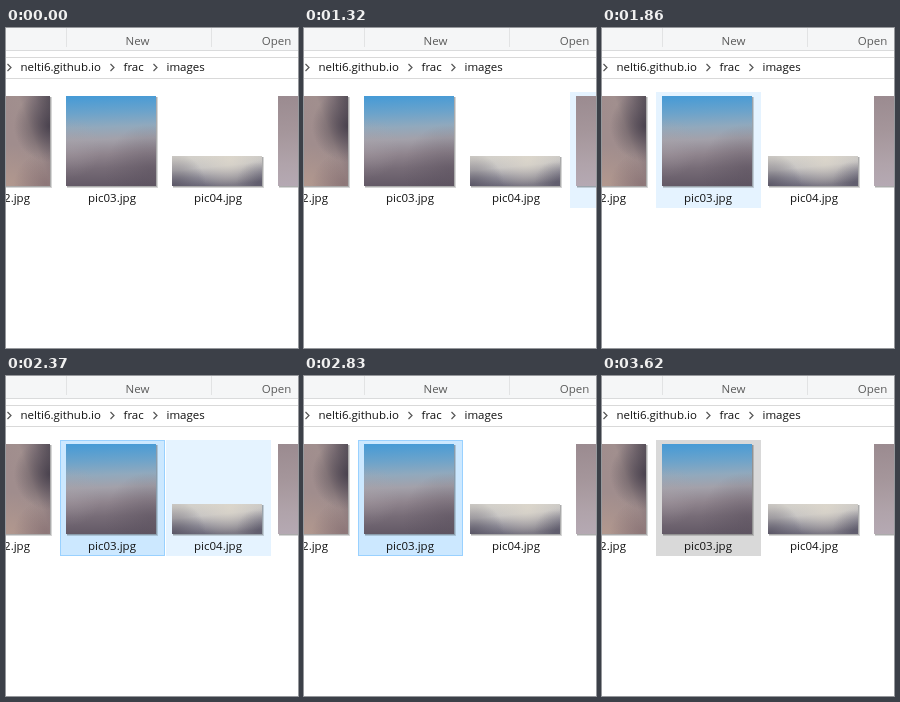
Recreate the animation shown at these times as an HTML page with a canvas. Size 292x320 px, loop 3670 ms.

```html
<!DOCTYPE html>
<html lang="en">
<head>
<meta charset="utf-8">
<title>Image folder</title>
<style>
html, body { margin: 0; width: 100%; height: 100%; overflow: hidden; background: #fff; }
canvas, svg { position: absolute; left: 0; top: 0; width: 292px; height: 320px; }
text { font: 11.5px "Open Sans", "Noto Sans", sans-serif; fill: #111; }
.group { fill: #5a5a5a; }
.mid { text-anchor: middle; }
</style>
</head>
<body>
<canvas id="stage"></canvas>
<svg viewBox="0 0 292 320">
  <text class="group mid" x="131.5" y="17">New</text>
  <text class="group mid" x="270.5" y="17">Open</text>
  <text x="14.5" y="43">nelti6.github.io</text>
  <text x="117.5" y="43">frac</text>
  <text x="160.5" y="43">images</text>
  <text class="mid" x="0" y="174">pic02.jpg</text>
  <text class="mid" x="106" y="174">pic03.jpg</text>
  <text class="mid" x="212" y="174">pic04.jpg</text>
</svg>
<script>
const W = 292, H = 320, LOOP = 3670;
const canvas = document.getElementById('stage');
const ctx = canvas.getContext('2d');
const ratio = window.devicePixelRatio || 1;
canvas.width = Math.round(W * ratio);
canvas.height = Math.round(H * ratio);
ctx.scale(ratio, ratio);

const HOVER = '#e5f3ff', SELECTED = '#cce8ff', BORDER = '#99d1ff', INACTIVE = '#d9d9d9';

// Start time, hovered tile, state of the third tile
const steps = [
  [0, 0, ''],
  [1120, 5, ''],
  [1680, 4, ''],
  [1860, 3, ''],
  [2090, 3, 'selected'],
  [2370, 4, 'selected'],
  [2520, 0, 'selected'],
  [3620, 0, 'inactive']
];

const tileX = n => 54 + (n - 3) * 106;

function rect(x, y, w, h, fill) {
  ctx.fillStyle = fill;
  ctx.fillRect(x, y, w, h);
}

function addStops(g, colors) {
  colors.forEach(([at, c]) => g.addColorStop(at, c));
  return g;
}

const linear = (x0, y0, x1, y1, colors) =>
  addStops(ctx.createLinearGradient(x0, y0, x1, y1), colors);

const glow = (x, y, r, rgb, alpha) =>
  addStops(ctx.createRadialGradient(x, y, 0, x, y, r),
    [[0, `rgba(${rgb},${alpha})`], [1, `rgba(${rgb},0)`]]);

function photo(n, y, h, fills) {
  const x = tileX(n) + 6;
  rect(x + 1, y + 1, 91, h + 1, 'rgba(0,0,0,.16)');
  rect(x + 1, y + 1, 90, h, 'rgba(0,0,0,.2)');
  fills.forEach(f => rect(x, y, 90, h, f));
}

const photos = [
  [2, 68, 90, [
    linear(0, 85, 46, 68, [[0, '#a08d8d'], [.35, '#a18f8e'], [.65, '#85777c'], [1, '#575059']]),
    glow(44, 98, 36, '58,52,66', .75),
    glow(2, 158, 42, '186,157,143', .7),
    glow(40, 156, 32, '132,108,111', .7)
  ]],
  [3, 68, 90, [
    linear(103, 68, 106, 158, [
      [0, '#479bd6'], [.18, '#6ba3cb'], [.34, '#91a9bd'], [.48, '#a3a1aa'],
      [.64, '#90858e'], [.8, '#776c77'], [1, '#625865']
    ]),
    glow(145, 142, 46, '84,74,88', .4),
    glow(65, 120, 30, '169,161,168', .35)
  ]],
  [4, 128, 30, [
    linear(208, 128, 211, 158, [[0, '#d3d0ca'], [.35, '#c6c4c3'], [.65, '#96949e'], [1, '#676475']]),
    glow(224, 132, 36, '226,219,205', .65),
    glow(168, 157, 32, '72,67,84', .6),
    glow(254, 156, 24, '88,84,99', .4)
  ]],
  [5, 68, 90, [
    linear(280, 68, 286, 158, [[0, '#9b8b90'], [.4, '#a5969b'], [.75, '#b0a3aa'], [1, '#b5a9b3']])
  ]]
];

function chevron(x) {
  ctx.beginPath();
  ctx.moveTo(x, 36);
  ctx.lineTo(x + 3.5, 39.5);
  ctx.lineTo(x, 43);
  ctx.strokeStyle = '#555';
  ctx.lineWidth = 1.2;
  ctx.stroke();
}

function header() {
  rect(0, 0, W, 22, '#f5f6f7');
  rect(0, 22, W, 1, '#dadbdc');
  [60, 205].forEach(x => rect(x, 0, 1, 19, '#e2e3e4'));
  [29, 50].forEach(y => rect(0, y, W, 1, '#d9d9d9'));
  [1.5, 104.5, 147.5].forEach(chevron);
}

function tile(n, fill, border) {
  const x = tileX(n);
  rect(x, 64, 105, 116, fill);
  if (!border) return;
  ctx.strokeStyle = border;
  ctx.lineWidth = 1;
  ctx.strokeRect(x + .5, 64.5, 104, 115);
}

function draw(t) {
  const [, hover, state] = steps.filter(s => s[0] <= t).pop();
  rect(0, 0, W, H, '#fff');
  header();
  if (hover) tile(hover, HOVER);
  if (state === 'selected') tile(3, SELECTED, BORDER);
  if (state === 'inactive') tile(3, INACTIVE);
  photos.forEach(p => photo(...p));
}

const start = performance.now();
function loop() {
  draw((performance.now() - start) % LOOP);
  requestAnimationFrame(loop);
}
loop();
</script>
</body>
</html>
```
